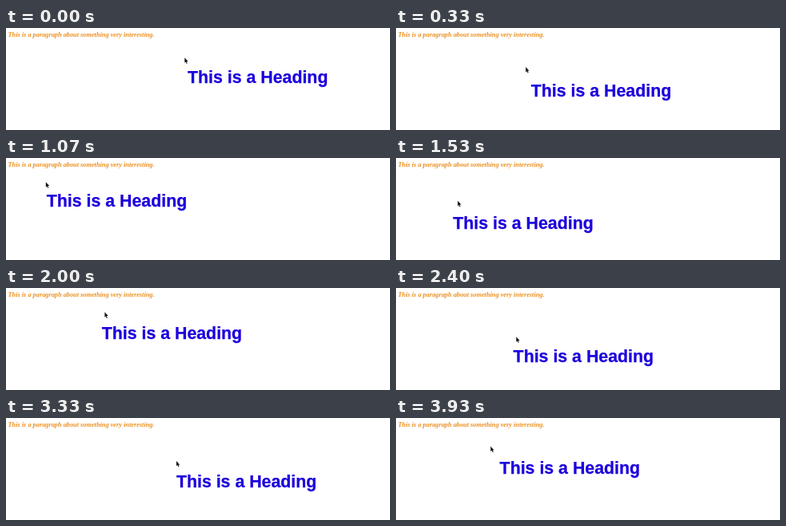
Write an HTML page that moves like this. It is 480 px wide and 128 px high and loops after 3.99 s.

```html
<!DOCTYPE html>
<html lang="en">
<head>
<meta charset="utf-8">
<title>Heading follows the pointer</title>
<style>
  html, body { margin: 0; width: 100%; height: 100%; overflow: hidden; background: #fff; }
  svg { display: block; width: 480px; height: 128px; }
  .note { font: italic bold 8.3px "Liberation Serif", "Times New Roman", serif; fill: #ec9020; }
  .heading {
    font: bold 21.33px "Liberation Sans", Arial, sans-serif;
    fill: #1c00dc; stroke: #1c00dc; stroke-width: .25;
  }
  .arrow { fill: #111; stroke: #fff; stroke-width: .6; paint-order: stroke; }
</style>
</head>
<body>
<svg viewBox="0 0 480 128">
  <text class="note" x="2.5" y="11">This is a paragraph about something very interesting.</text>
  <text class="heading" id="heading" x="-0.4" y="33">This is a Heading</text>
  <path class="arrow" id="arrow" d="M.3-.8v6.4l1.4-1.2 1.1 2.4 1-.5-1.1-2.3h1.9Z"/>
</svg>
<script>
  const LOOP = 3990, STEP = 200 / 3, LAG = 0.5, SPACING = 4;

  // Pointer path, one point every SPACING steps; the outer two only set the end slopes
  const path = [
    [250, 22], [223, 38], [176, 54], [118, 26], [74, 8.5], [49.5, 31],
    [50, 55], [86, 52], [111, 32], [134, 36], [150, 62], [188, 55],
    [209, 38], [214, 50], [209, 56], [195, 41], [107, 36], [200, 40]
  ];

  // Catmull-Rom curve through four neighbouring values
  function spline(a, b, c, d, u) {
    return b + u / 2 * (c - a + u * (2 * a - 5 * b + 4 * c - d + u * (3 * (b - c) + d - a)));
  }

  function place(id, step) {
    const pos = step / SPACING + 1;
    const i = Math.max(1, Math.floor(pos));
    const near = path.slice(i - 1, i + 3);
    const [x, y] = [0, 1].map(axis => spline(...near.map(p => p[axis]), pos - i));
    document.getElementById(id).setAttribute("transform", `translate(${x.toFixed(1)} ${y.toFixed(1)})`);
  }

  function draw() {
    const step = Math.floor((performance.now() % LOOP + 5) / STEP);
    place("arrow", step);
    place("heading", step - LAG);
    requestAnimationFrame(draw);
  }
  draw();
</script>
</body>
</html>
```
